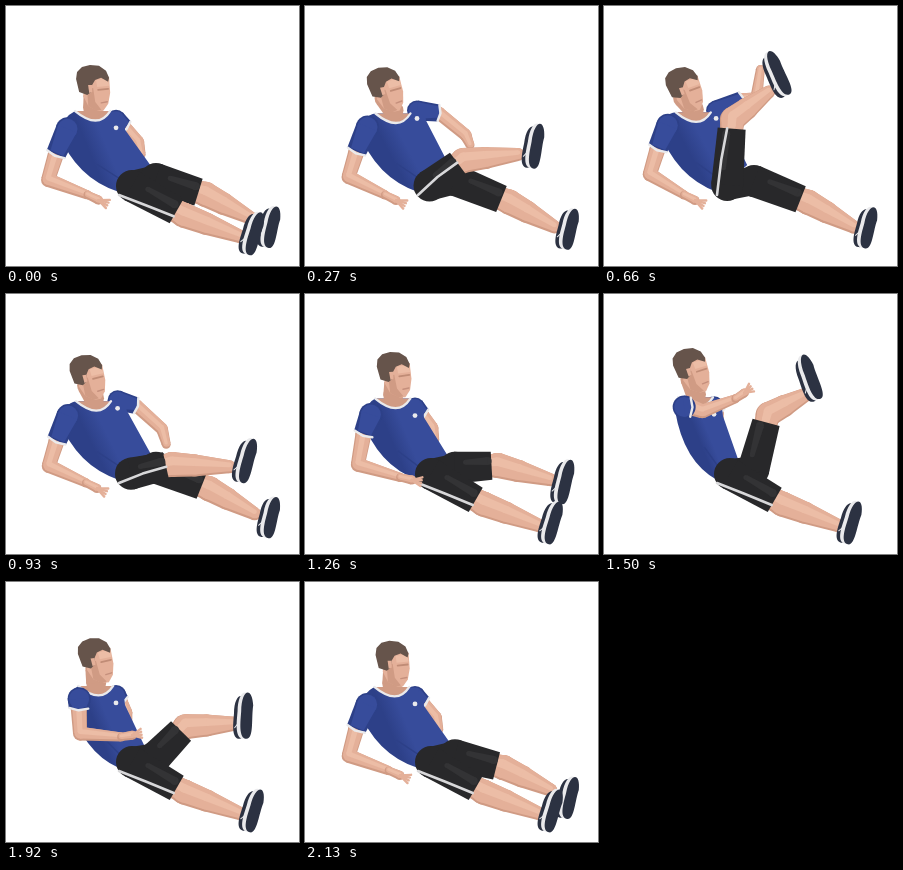
An HTML page with a canvas for the animation above (2160 ms loop, 293 by 260 pixels).

```html
<!DOCTYPE html>
<html lang="en">
<meta charset="utf-8">
<title>Alternating toe-touch crunch</title>
<style>
html, body { margin: 0; width: 100%; height: 100%; overflow: hidden; background: #fff }
canvas { display: block }
</style>
<canvas id="stage" width="293" height="260"></canvas>
<script>
const ctx = document.getElementById('stage').getContext('2d');
const LOOP = 2160, STEP = 30;
const SKIN = '#e4b099', SKIN_DARK = '#d09b84', SKIN_LIGHT = '#ecbda6';
const BLUE = '#374c9b', BLUE_DARK = '#2d4088', BLACK = '#28282a', NAVY = '#2c3242', WHITE = '#eaeaec';
const HAIR = '#66544b';

// A joint has a resting place and up to two moves, one per repetition.
// Each move is [dx, dy] to the top of the lift, then the bow of its path.
const joint = (x, y, near = [], far = []) => (u, v) => {
  const go = ([dx = 0, dy = 0, bx = 0, by = 0], s) =>
    [dx * s + 4 * bx * s * (1 - s), dy * s + 4 * by * s * (1 - s)];
  const a = go(near, u), b = go(far, v);
  return [x + a[0] + b[0], y + a[1] + b[1]];
};

const body = {
  skull: joint(87, 74, [-8, 2, -4, 1], [-4, -6, 4, 0]),
  throat: joint(87, 106, [3, 1, 0, 2], [6, -2]),
  waistNear: joint(113, 186),
  waistFar: joint(146, 161, [-3, -2], [-14, 6]),
  hipNear: joint(126, 180, [-3, -1]),
  hipFar: joint(150, 173, [0, 2], [-1, 4]),
  near: {
    shoulder: joint(61, 123, [3, -4], [23, -12]),
    sleeve: joint(49, 149, [5, -7], [45, -43]),
    elbow: joint(41, 174, [5, -6], [72, -82, -5, 21]),
    wrist: joint(80, 189, [], [59, -121, 4, 30]),
    hand: joint(100, 199, [], [52, -146, 8, 30]),
    knee: joint(178, 210, [-54, -101, 7, -5]),
    ankle: joint(235, 232, [-78, -153, 17, -7]),
    heel: joint(243, 245, [-69, -169, 19, -3]),
    toe: joint(252, 208, [-101, -169, 31, -5])
  },
  far: {
    shoulder: joint(110, 114, [2, -9, 1, -5], [0, -2]),
    sleeve: joint(119, 122, [19, -30, 5, 0], [-7, -4]),
    elbow: joint(132, 136, [17, -50, 20, 18], [-22, -10]),
    hand: joint(135, 148, [18, -98, 21, 40], [-25, -12]),
    knee: joint(200, 190, [4, 6, 2, 3], [-45, -82, 3, -2]),
    ankle: joint(245, 215, [5, 6, 2, 3], [-62, -139, 20, 0]),
    heel: joint(262, 240, [-2, -3], [-67, -167, 12, 0]),
    toe: joint(268, 205, [-1, -3], [-102, -168, 25, -5])
  }
};

// How far a lift has come: 1 at its top, 0 once it is farther off than reach.
function lift(t, top, reach) {
  const d = Math.abs(t - top);
  return (1 + Math.cos(Math.PI * Math.min(1, d / reach, (LOOP - d) / reach))) / 2;
}
const place = (part, u, v) => Object.fromEntries(Object.entries(part).map(([name, p]) =>
  [name, typeof p === 'function' ? p(u, v) : place(p, u, v)]));

const mix = (a, b, u) => [a[0] + (b[0] - a[0]) * u, a[1] + (b[1] - a[1]) * u];
const add = (p, x, y) => [p[0] + x, p[1] + y];
function unit(a, b) {
  const x = b[0] - a[0], y = b[1] - a[1], l = Math.hypot(x, y) || 1;
  return [x / l, y / l];
}

function poly(color, pts) {
  ctx.fillStyle = color;
  ctx.beginPath();
  pts.forEach(p => ctx.lineTo(...p));
  ctx.fill();
}
function line(color, width, ...pts) {
  ctx.strokeStyle = color;
  ctx.lineWidth = width;
  ctx.beginPath();
  pts.forEach(p => ctx.lineTo(...p));
  ctx.stroke();
}
// Tapered tube through points with a width at each; flat leaves the end square.
function limb(color, pts, widths, flat) {
  pts.forEach((p, i) => {
    const r = widths[i] / 2;
    if (!flat || i < pts.length - 1) {
      ctx.fillStyle = color;
      ctx.beginPath();
      ctx.arc(...p, r, 0, 7);
      ctx.fill();
    }
    if (!i) return;
    const q = pts[i - 1], s = widths[i - 1] / 2, [x, y] = unit(q, p);
    poly(color, [add(q, -y * s, x * s), add(p, -y * r, x * r), add(p, y * r, -x * r), add(q, y * s, -x * s)]);
  });
}
function flesh(pts, widths) {
  limb(SKIN_DARK, pts, widths);
  limb(SKIN, pts.map(p => add(p, .4, -1)), widths.map(w => w - 2));
  limb(SKIN_LIGHT, pts.map((p, i) => add(p, 0, -widths[i] * .15)), widths.map(w => w * .35));
}
function sleeve({ shoulder, sleeve: end }, from, to) {
  const [x, y] = unit(shoulder, end), r = to / 2 - .5;
  limb(BLUE_DARK, [shoulder, end], [from, to], true);
  limb(BLUE, [shoulder, add(end, 1, -1)], [from - 3, to - 6], true);
  line(WHITE, 2.4, add(end, -y * r, x * r), add(end, x * 2, y * 2), add(end, y * r, -x * r));
}

// Dark upper, pale midsole and dark outsole, side by side.
function shoe(heel, toe) {
  const len = Math.hypot(toe[0] - heel[0], toe[1] - heel[1]);
  const layer = (color, y, w, l = len) => {
    ctx.fillStyle = color;
    ctx.beginPath();
    ctx.moveTo(-5, y);
    ctx.bezierCurveTo(-5, y - w * 1.3, l * .3, y - w, l * .55, y - w * .9);
    ctx.bezierCurveTo(l + 5, y - w * .9, l + 7, y + w * .8, l * .7, y + w);
    ctx.bezierCurveTo(l * .4, y + w * .7, -5, y + w * 1.2, -5, y);
    ctx.fill();
  };
  ctx.save();
  ctx.translate(...heel);
  ctx.rotate(Math.atan2(toe[1] - heel[1], toe[0] - heel[0]));
  layer(NAVY, -5, 6.5, len * .9);
  layer(WHITE, -1, 7);
  layer(NAVY, 2, 6.3);
  line(WHITE, 1, [6, -10], [10, -7]);
  ctx.restore();
}

function leg(hip, { knee, ankle, heel, toe }, stripeFrom) {
  const edge = mix(hip, knee, .86), [x, y] = unit(hip, knee);
  flesh([mix(hip, knee, .85), knee, mix(knee, ankle, .4), ankle], [23, 25, 22, 13]);
  shoe(heel, toe);
  limb(BLACK, [hip, edge], [32, 28], true);
  limb('#333335', [add(mix(hip, edge, .3), y * 5, -x * 5), add(mix(hip, edge, .9), y * 5, -x * 5)], [5, 8]);
  if (stripeFrom) {
    const off = 2.5 + 7 * y;
    line('#d8d8da', 2.6, add(stripeFrom, 0, 3), add(mix(stripeFrom, edge, .5), -y * off * .7, x * off * .7),
      add(edge, -y * off, x * off));
  }
}

function arm({ sleeve: end, elbow, wrist, hand }) {
  const [x, y] = unit(wrist, hand), palm = mix(wrist, hand, .55);
  flesh([end, elbow, wrist], [16, 14, 9]);
  flesh([wrist, palm], [8, 9]);
  for (let s = -5; s <= 4; s += 3) line(SKIN, 2.4, palm, add(hand, -y * s, x * s));
}

function head(skull, tilt) {
  ctx.save();
  ctx.translate(...skull);
  ctx.rotate(tilt);
  poly(SKIN, [[-8, -2], [16, -3], [17, 13], [15, 24], [10, 31], [4, 31], [-5, 26], [-10, 16]]);
  poly(SKIN_DARK, [[-6, 9], [0, 8], [2, 22], [8, 30], [3, 31], [-5, 26]]);
  poly(SKIN_LIGHT, [[3, 0], [15, -1], [16, 6], [4, 7]]);
  line('#c08c76', 1.8, [5, 10], [15, 9]);
  line('#c58f7c', 1.4, [8, 23], [14, 22]);
  poly(HAIR, [[-17, -1], [-16, -8], [-11, -13], [-3, -15], [6, -14], [13, -9], [16, -2],
    [15, 2], [8, -2], [2, 0], [-1, 5], [-2, 12], [-6, 15], [-14, 12]]);
  poly(SKIN, [[-5, 5], [-1, 5], [-1, 12], [-4, 13]]);
  ctx.restore();
}

function torso({ throat, waistNear, waistFar, near, far }) {
  const a = near.shoulder, b = far.shoulder, side = mix(a, waistNear, .5);
  const left = add(throat, -18, -1), right = add(throat, 17, -1);
  const g = ctx.createLinearGradient(...side, ...mix(b, waistFar, .5));
  g.addColorStop(0, BLUE_DARK);
  g.addColorStop(.4, BLUE);
  ctx.fillStyle = g;
  ctx.beginPath();
  ctx.moveTo(...add(a, -9, 4));
  ctx.quadraticCurveTo(...add(a, -4, -12), ...left);
  ctx.lineTo(...right);
  ctx.quadraticCurveTo(...add(b, 8, -6), ...add(b, 9, 10));
  ctx.lineTo(...waistFar);
  ctx.lineTo(...waistNear);
  ctx.quadraticCurveTo(...add(side, -17, 18), ...add(a, -9, 4));
  ctx.fill();
  line(BLUE_DARK, 1.4, add(side, 4, 4), mix(waistNear, waistFar, .3));

  ctx.fillStyle = SKIN_DARK;
  ctx.strokeStyle = WHITE;
  ctx.lineWidth = 2.3;
  ctx.beginPath();
  ctx.moveTo(...left);
  ctx.quadraticCurveTo(...add(throat, 5, 18), ...right);
  ctx.fill();
  ctx.stroke();
  ctx.fillStyle = WHITE;
  ctx.beginPath();
  ctx.arc(...add(b, 0, 8), 2.4, 0, 7);
  ctx.fill();
}

function draw(t) {
  const u = lift(t, 570, 600), v = lift(t, 1650, 560);
  const p = place(body, u, v), { near, far } = p;
  ctx.clearRect(0, 0, 293, 260);
  ctx.lineJoin = ctx.lineCap = 'round';

  flesh([far.sleeve, far.elbow, far.hand], [13, 12, 9]);
  sleeve(far, 20, 17);
  torso(p);
  limb(SKIN_DARK, [add(p.skull, 0, 16), add(p.throat, 0, -4)], [19, 20]);
  head(p.skull, -.25 * (u * (2 - u) + v));

  limb(BLACK, [p.hipNear, p.hipFar], [30, 28]);
  leg(p.hipFar, far);
  leg(p.hipNear, near, p.waistNear);
  arm(near);
  sleeve(near, 23, 20);
}

let start;
function tick(now) {
  start ??= now;
  draw(Math.floor((now - start) % LOOP / STEP) * STEP);
  requestAnimationFrame(tick);
}
draw(0);
requestAnimationFrame(tick);
</script>
</html>
```
